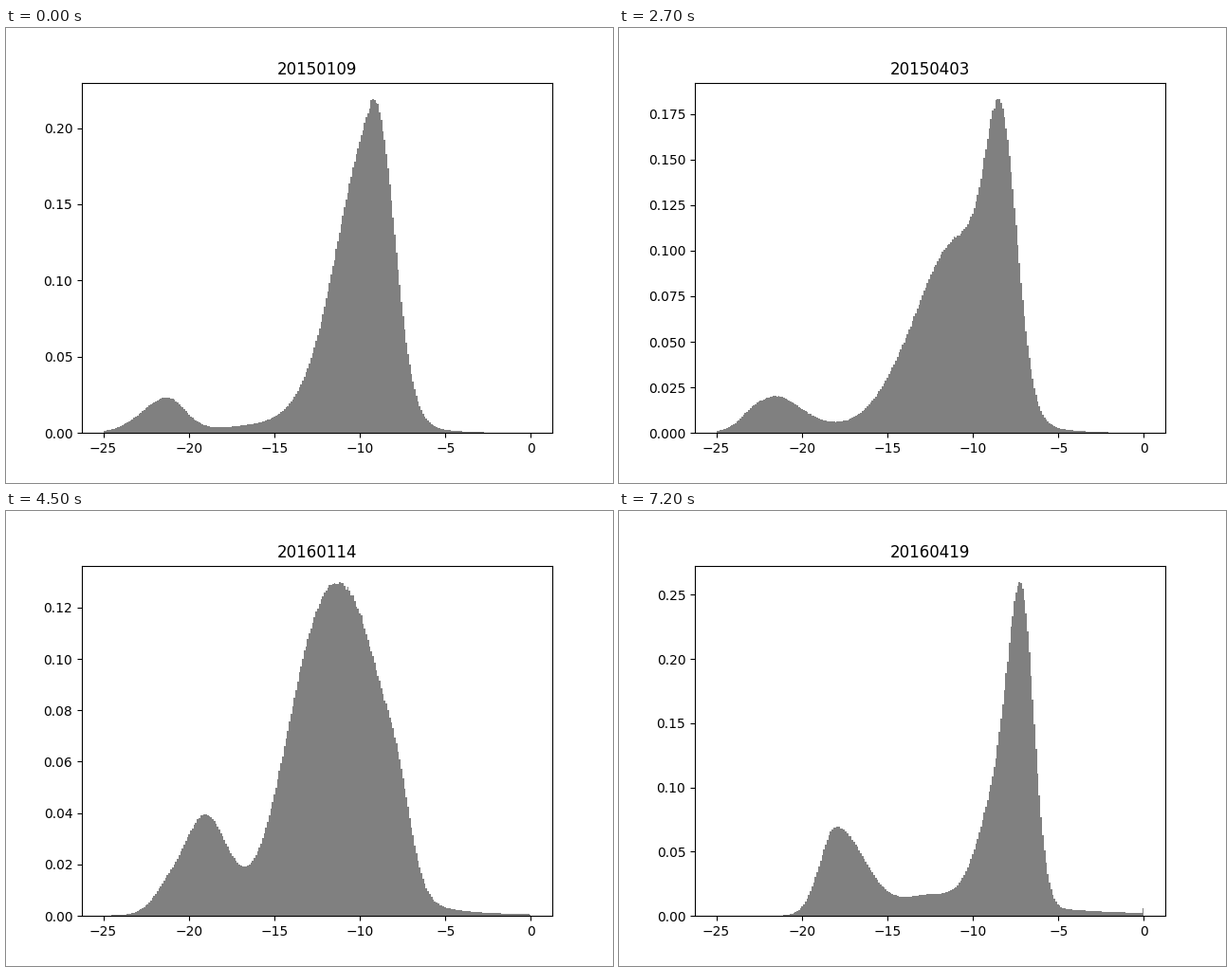
Recreate the animation shown at these times as a matplotlib script. Size 640 by 480 pixels, loop 8100 ms.

```python
import numpy as np
import matplotlib.pyplot as plt
from matplotlib.animation import FuncAnimation

BINS = 256
EDGES = np.linspace(-25, 0, BINS + 1)
WIDTH = EDGES[1] - EDGES[0]
X = EDGES[:-1] + WIDTH / 2


def offset(center, left, right):
    """Distance from the center, scaled separately on each side."""
    d = X - center
    return np.abs(d) / np.where(d < 0, left, right)


def skirt(center, height, left, right):
    return height * np.exp(-offset(center, left, right))


def lobe(center, height, left, right):
    return height * np.exp(-offset(center, left, right) ** 2 / 2)


def scale(dens, peak):
    return dens * peak / dens.max()


def smooth(dens, sigma):
    k = np.arange(-30, 31)
    kernel = np.exp(-0.5 * (k / sigma) ** 2)
    return np.convolve(dens, kernel / kernel.sum(), mode="same")


def roughen(dens, seed):
    """Small sampling noise that keeps the peak height."""
    rng = np.random.default_rng(seed)
    return scale(dens * (1 + 0.004 * rng.standard_normal(BINS)), dens.max())


# Each profile: exponential skirt, small left lobe, then the main lobes.
jan15 = scale(skirt(-9.3, 32, 4, 1.54)
              + lobe(-21.3, 21.8, 1.42, 1.06)
              + lobe(-9.3, 175, 2, 1.2)
              + lobe(-8.5, 30, 0.65, 0.8), 0.2189)

mar15 = scale(skirt(-8.5, 26, 4.9, 1.4)
              + lobe(-22.5, 23.7, 0.96, 1.53)
              + lobe(-10.4, 91, 1.65, 1.3)
              + lobe(-8.38, 192, 0.87, 0.9), 0.2476)

apr15 = scale(skirt(-8, 14.4, 4, 1.75)
              + lobe(-21, 21.3, 0.98, 1.64)
              + lobe(-12.3, 120, 2.12, 2.2)
              + lobe(-7.9, 71, 1.27, 0.89), 0.1264)

feb16 = scale(skirt(-10, 9.4, 4, 4.6)
              + lobe(-18.9, 65.7, 1.2, 1.25)
              + lobe(-12.3, 94, 1.9, 1.64)
              + lobe(-10, 94, 1.29, 1.32), 0.14796)

mar16 = scale(skirt(-8.7, 8.3, 4, 4.3)
              + lobe(-16.3, 69.5, 1.31, 1.48)
              + lobe(-10.2, 93, 1.5, 1.4)
              + lobe(-8.4, 141.5, 1.06, 0.932), 0.1963)

apr16 = scale(skirt(-7.2, 8.8, 4, 5.2)
              + lobe(-18, 69, 0.92, 1.7)
              + lobe(-12.5, 14, 1.6, 2)
              + lobe(-8.4, 92, 1.2, 0.9)
              + lobe(-7.1, 216, 0.75, 0.72), 0.2596)
apr16[-1] = 0.006  # values clipped at zero pile up in the last bin

SCENES = [
    ("20150109", jan15),
    ("20150214", smooth((jan15 + mar15) / 2, 7)),
    ("20150310", mar15),
    ("20150403", 0.55 * mar15 + 0.45 * apr15),
    ("20150427", apr15),
    ("20160114", (apr15 + feb16) / 2),
    ("20160207", feb16),
    ("20160326", mar16),
    ("20160419", apr16),
]
SCENES = [(date, roughen(dens, n)) for n, (date, dens) in enumerate(SCENES)]

fig, ax = plt.subplots(figsize=(6.4, 4.8), dpi=100)
bars = ax.bar(EDGES[:-1], SCENES[0][1], WIDTH, align="edge", color="gray")
title = ax.set_title(SCENES[0][0])
ax.set_xlim(-26.25, 1.25)


def draw(n):
    date, dens = SCENES[n]
    for bar, height in zip(bars, dens):
        bar.set_height(height)
    title.set_text(date)
    ax.set_ylim(0, 1.05 * dens.max())
    return [*bars, title]


anim = FuncAnimation(fig, draw, frames=len(SCENES), interval=900,
                     init_func=lambda: draw(0), repeat=True, repeat_delay=0)
plt.show()
```
